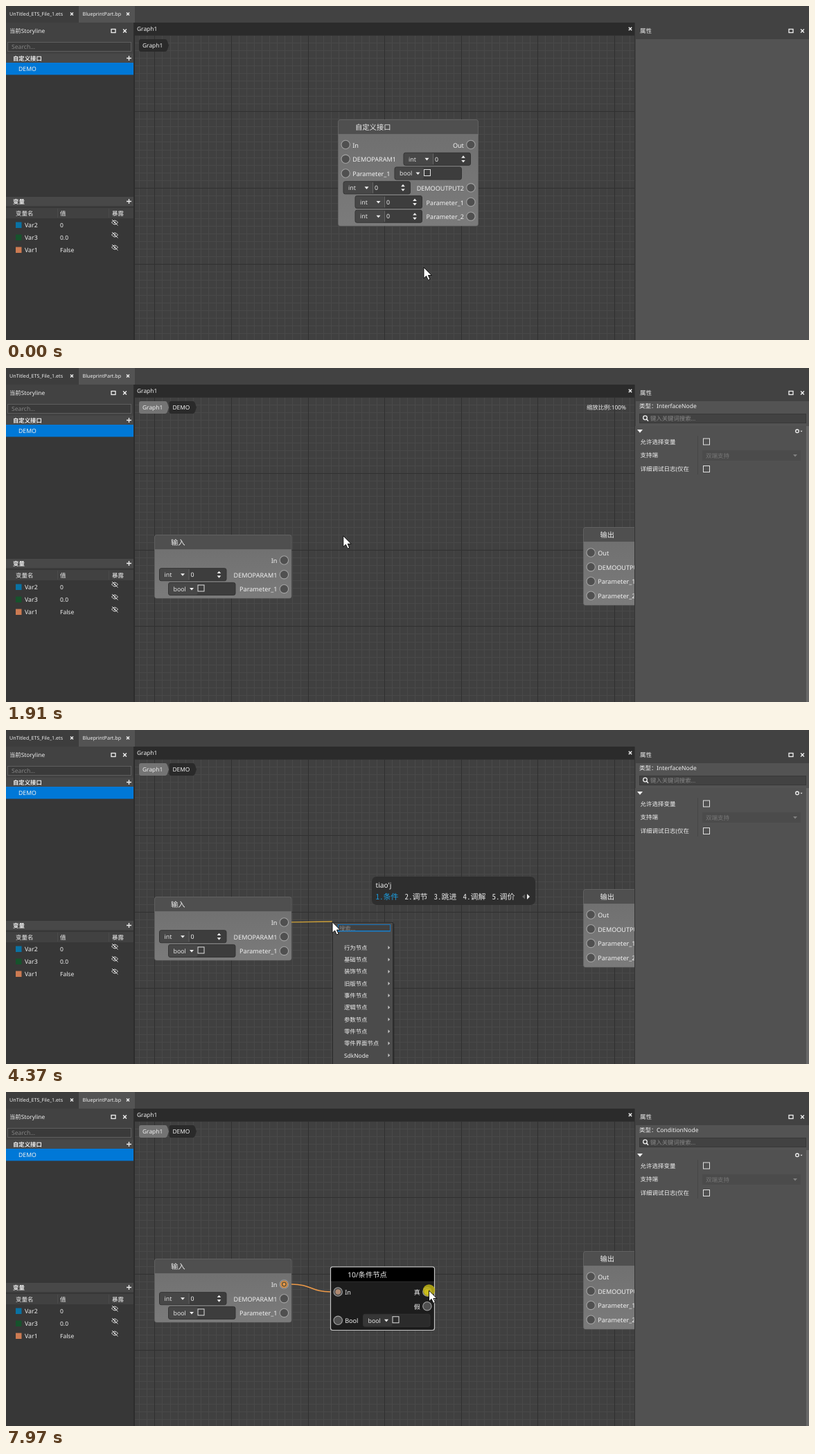
Write an HTML page that moves like this. It is 1159 by 483 pixels and loops after 8 s.

```html
<!DOCTYPE html>
<html>
<head>
<meta charset="utf-8">
<style>
html, body { margin: 0; width: 100%; height: 100%; overflow: hidden; background: #404040; }
svg { display: block; width: 1159px; height: 483px; }
text { font-family: "Noto Sans", "Noto Sans CJK SC", "Noto Sans CJK", sans-serif; text-rendering: geometricPrecision; white-space: pre; }
.ime text { font-family: "Noto Sans Mono CJK SC", "Noto Sans CJK SC", "Noto Sans CJK", monospace; }
</style>
</head>
<body>
<svg id="stage" viewBox="0 0 1159 483"></svg>
<script>
const LOOP = 8000;
const WHITE = '#f0f0f0', ORANGE = '#ee9a48';

// Markup helpers; text is placed by its vertical centre.
const rect = (x, y, w, h, fill, extra = '') =>
  `<rect x="${x}" y="${y}" width="${w}" height="${h}" fill="${fill}" ${extra}/>`;
const path = (d, stroke, width = 1, extra = 'fill="none"') =>
  `<path d="${d}" stroke="${stroke}" stroke-width="${width}" ${extra}/>`;
const shape = (d, fill) => `<path d="${d}" fill="${fill}"/>`;
const circle = (x, y, r, fill, extra = '') =>
  `<circle cx="${x}" cy="${y}" r="${r}" fill="${fill}" ${extra}/>`;
const text = (x, y, str, size = 8.5, fill = WHITE, extra = '') =>
  `<text x="${x}" y="${y + size * 0.37}" font-size="${size}" fill="${fill}" ${extra}>${str}</text>`;
const group = (id, body, extra = '') => `<g id="${id}" ${extra}>${body}</g>`;

const END = 'text-anchor="end"', BOLD = 'font-weight="700"';
const down = (x, y, s = 3, fill = WHITE) => shape(`M${x - s} ${y - s / 2}h${2 * s}l${-s} ${s * 1.2}z`, fill);
const up = (x, y, s = 3) => shape(`M${x - s} ${y + s / 2}h${2 * s}l${-s} ${-s * 1.2}z`, WHITE);
const right = (x, y, s, fill = '#c8c8c8') => shape(`M${x} ${y - s}l${s} ${s}l${-s} ${s}z`, fill);
const cross = (x, y, s = 2.4) => path(`M${x - s} ${y - s}l${2 * s} ${2 * s}m0 ${-2 * s}l${-2 * s} ${2 * s}`, WHITE, 1.4);
const plus = (x, y) => path(`M${x - 3.5} ${y}h7m-3.5 -3.5v7`, WHITE, 1.3);
const maximize = (x, y) => rect(x - 3, y - 2.5, 6, 5, 'none', `stroke="${WHITE}" stroke-width="1.3"`);
const checkbox = (x, y) => rect(x - 4.5, y - 4.5, 9, 9, 'none', 'stroke="#e0e0e0"');
const hiddenEye = (x, y) =>
  path(`M${x - 4.5} ${y}q4.5 -6 9 0q-4.5 6 -9 0M${x - 4} ${y - 4}l8.5 8.5`, '#d8d8d8', 1) + circle(x, y, 1.3, '#d8d8d8');

function gridLines(step, color) {
  let d = '';
  for (let x = 214.4 - 2 * step; x < 908; x += step) if (x > 186) d += `M${Math.round(x) + 0.5} 42V483`;
  for (let y = 153.2 - 10 * step; y < 483; y += step) if (y > 42) d += `M186 ${Math.round(y) - 0.5}H908`;
  return path(d, color);
}

function widget(type, x, y, dark) {
  const box = rect(x, y - 9, 96.5, 18, dark ? '#2b2b2b' : '#3d3d3d', 'rx="2.5" stroke="#333"')
    + rect(x + 0.5, y - 8.5, 41.5, 17, dark ? '#363636' : '#474747', 'rx="2"')
    + text(x + 7, y, type, 8.8, '#e4e4e4') + down(x + 33.5, y);
  if (type === 'bool') return box + checkbox(x + 47, y - 1);
  return box + path(`M${x + 42.5} ${y - 8}v16`, '#666') + text(x + 45, y, '0', 8.8)
    + up(x + 86, y - 3, 2.8) + down(x + 86, y + 3, 2.8);
}

const port = (x, y) => circle(x, y, 6.2, '#505050', 'stroke="#a2a2a2" stroke-width="1.1"');
const litPort = (x, y) => circle(x, y, 4.5, '#6b5a3c', `stroke="${ORANGE}" stroke-width="1.6"`) + circle(x, y, 2, ORANGE);

// Each row: [y, label, side, widget type, widget x]
function node({ x, y, w, h, title, titleX, rows }, selected) {
  const outline = `M${x + 3} ${y}H${x + w - 3}q3 0 3 3V${y + 22}H${x}V${y + 3}q0 -3 3 -3z`;
  const body = rect(x, y, w, h, selected ? '#1d1d1d' : 'url(#body)', 'rx="3"')
    + shape(outline, selected ? '#000' : '#4f4f4f')
    + path(`M${x} ${y + 21.5}h${w}`, selected ? '#333' : '#868686')
    + rect(x, y, w, h, 'none', `rx="3" stroke="${selected ? '#c4c4c4' : '#6a6a6a'}" stroke-width="${selected ? 1.2 : 0.6}"`)
    + text(titleX, y + 11, title, 10.3);
  return body + rows.map(([ry, label, side, type, wx]) => {
    const left = side === 'L', px = left ? x + 10.7 : x + w - 10.6;
    return port(px, ry) + text(left ? px + 10 : px - 10, ry + 0.7, label, 9.1, WHITE, left ? '' : END)
      + (type ? widget(type, wx, ry, selected) : '');
  }).join('');
}

const custom = { x: 479.5, y: 164.5, w: 202, h: 153.5, title: '自定义接口', titleX: 504, rows: [
  [200.5, 'In', 'L'], [200.5, 'Out', 'R'], [221.3, 'DEMOPARAM1', 'L', 'int', 574], [242, 'Parameter_1', 'L', 'bool', 561],
  [262.8, 'DEMOOUTPUT2', 'R', 'int', 487], [283.5, 'Parameter_1', 'R', 'int', 504], [304.2, 'Parameter_2', 'R', 'int', 504]] };
const input = { x: 214.5, y: 241.5, w: 197.5, h: 91.5, title: '输入', titleX: 238, rows: [
  [278, 'In', 'R'], [298.7, 'DEMOPARAM1', 'R', 'int', 221.5], [319.4, 'Parameter_1', 'R', 'bool', 234.5]] };
const output = { x: 833.5, y: 230.5, w: 120, h: 112.5, title: '输出', titleX: 857.5, rows: [
  [267, 'Out', 'L'], [287.7, 'DEMOOUTPUT2', 'L'], [308.4, 'Parameter_1', 'L'], [329.2, 'Parameter_2', 'L']] };
const condition = { x: 468.5, y: 252.8, w: 150, h: 91.7, title: '10/条件节点', titleX: 493, rows: [
  [289, 'In', 'L'], [289, '真', 'R'], [309.7, '假', 'R'], [330.3, 'Bool', 'L', 'bool', 515.5]] };

function leftPanel() {
  const vars = [['Var2', '0', '#0a72a3'], ['Var3', '0.0', '#16532c'], ['Var1', 'False', '#cc7b52']];
  return rect(0, 0, 1159, 24, '#424242') + rect(0, 0, 105, 24, '#3d3d3d') + rect(105, 0, 81, 24, '#535353')
    + text(5, 11.5, 'UnTitled_ETS_File_1.ets', 7.15) + cross(95, 11.5, 2)
    + text(110.5, 11.5, 'BlueprintPart.bp', 7.15) + cross(176, 11.5, 2)
    + rect(0, 24, 184, 459, '#373737') + rect(0, 24, 184, 45, '#424242') + rect(184, 24, 2, 459, '#2c2c2c')
    + text(5, 36, '当前Storyline', 8.35) + maximize(155, 36) + cross(171.5, 36)
    + rect(2.5, 52.5, 178, 13, '#3a3a3a', 'stroke="#5e5e5e"') + text(8, 59, 'Search...', 8.6, '#858585')
    + rect(0, 69, 184, 13, '#484848') + text(10, 75.5, '自定义接口', 8.4, WHITE, BOLD) + plus(177.5, 75.5)
    + rect(0, 82, 184, 17.5, '#0078d7') + text(18, 91, 'DEMO', 8.7)
    + rect(0, 276, 184, 13.5, '#484848') + text(10, 283, '变量', 8.5, WHITE, BOLD) + plus(177.5, 282.5)
    + rect(0, 292, 184, 15, '#414141') + path('M74.5 293v13M148.5 293v13', '#4b4b4b')
    + text(14, 300, '变量名') + text(78, 300, '值') + text(153, 300, '暴露')
    + vars.map(([name, value, color], i) => {
      const y = 317 + i * 18;
      return rect(14, y - 4.5, 8.5, 8.5, color) + text(27, y, name, 8.8) + text(78, y, value) + hiddenEye(157, y - 4);
    }).join('');
}

function properties() {
  const rows = [[106.5, '允许选择变量'], [126, '支持端'], [146, '详细调试日志(仅在']];
  return text(914, 55, '类型：') + `<text id="type" x="939" y="58.2" font-size="8.5" fill="${WHITE}"></text>`
    + rect(914.5, 66.5, 240, 13, '#424242', 'stroke="#383838"')
    + circle(922.5, 72, 2.8, 'none', `stroke="${WHITE}" stroke-width="1.3"`) + path('M924.5 74l2.5 2.7', WHITE, 1.5)
    + text(930, 73, '键入关键词搜索...', 8.4, '#888')
    + rect(908, 84, 247, 399, '#515151') + rect(1155, 84, 4, 399, '#686868')
    + down(915, 91, 4) + circle(1142, 91.3, 2.3, 'none', `stroke="${WHITE}" stroke-width="1.3"`) + down(1148, 91.5, 1.5)
    + path('M998.5 98V154', '#474747')
    + rows.map(([y, label]) => text(915.5, y, label)).join('')
    + checkbox(1011, 106.5) + checkbox(1011, 146)
    + rect(1005, 119, 142, 15, '#4b4b4b') + text(1010, 127, '双端支持', 8.5, '#777') + down(1139, 126.5, 3, '#808080');
}

const crumb = (x, w, label, fill) =>
  shape(`M${x + 3} 48H${x + w - 3}q2 0 3 3l2 6l-2 6q-1 3 -3 3H${x + 3}q-3 0 -3 -3V51q0 -3 3 -3z`, fill) + text(x + 5, 57, label, 8.4);

function menuFrame(h, focused) {
  return rect(473, 280, 87.5, h, '#222', 'opacity=".6"') + rect(471.5, 278.5, 87, h, '#4b4b4b', 'stroke="#2c2c2c"')
    + rect(479.5, 281.5, 75, 9, '#404040', `stroke="${focused ? '#1674bd' : '#303030'}"`)
    + (focused ? path('M479 291H555', '#1583d8', 1.2) : '');
}
function fullMenu() {
  const items = ['行为节点', '基础节点', '装饰节点', '旧版节点', '事件节点', '逻辑节点', '参数节点', '零件节点', '零件界面节点', 'SdkNode'];
  return menuFrame(230, true) + items.map((label, i) => {
    const y = 314.7 + i * 17.3;
    return text(488, y, label, 8.4) + right(551.5, y, 2.6);
  }).join('');
}
function filteredMenu(chosen) {
  const fileIcon = y => path(`M480 ${y + 4.5}h-4.5v-9h5l2.5 2.5v2`, '#ddd', 0.9) + circle(482, y + 2.3, 2, 'none', 'stroke="#ddd" stroke-width=".9"');
  return menuFrame(68.5, chosen < 0) + text(481, 286.5, '条件', 8.3)
    + ['条件遍历节点', '10/条件节点', '时间条件通过'].map((label, i) => {
      const y = 303 + i * 17.3;
      return (i === chosen ? rect(472, y - 8.7, 86.5, 17.3, '#0a70e8') : '') + fileIcon(y) + text(488, y, label, 8.4);
    }).join('');
}

function candidates(typed, words) {
  const pitch = words[0].length * 11 + 20, w = words.length * pitch + 26;
  return rect(528, 212, w, 41, '#2e2e2e', 'rx="7"')
    + text(533.5, 224, typed, 10.2, WHITE, `style="font-family:'Noto Sans',sans-serif"`)
    + words.map((word, i) => text(533.5 + i * pitch, 240.5, `${i + 1}.${word}`, 11, i ? '#e8e8e8' : '#1b9de0', 'font-weight="300"')).join('')
    + shape(`M${528 + w - 15} 237.5v7l-4 -3.5z`, '#666') + right(528 + w - 12, 241, 4, WHITE);
}
const typing = [
  [3770, 't', [...'他她天图题']], [3870, 'ti', [...'题提体替梯']], [3970, 'tia', [...'条调跳挑天']],
  [4100, 'tiao', [...'条调跳挑眺']], [4300, "tiao'j", ['条件', '调节', '跳进', '调解', '调价']]];

const ids = {};
document.getElementById('stage').innerHTML = `
  <defs>
    <linearGradient id="body" x2="0" y2="1"><stop stop-color="#6e6e6e"/><stop offset="1" stop-color="#7b7b7b"/></linearGradient>
    <clipPath id="view"><rect x="186" y="42" width="721" height="441"/></clipPath>
  </defs>`
  + rect(186, 42, 722, 441, '#404040') + gridLines(11.06, '#494949') + gridLines(110.6, '#303030')
  + leftPanel()
  + rect(186, 24, 722, 18, '#2b2b2b') + text(189, 33, 'Graph1', 8.4) + cross(901, 33, 2.2)
  + rect(907, 24, 252, 459, '#535353') + rect(907, 24, 1.5, 459, '#333') + rect(908, 24, 251, 24, '#424242')
  + text(915, 36, '属性') + maximize(1133, 36) + cross(1149.5, 36)
  + group('props', properties())
  + group('outer', crumb(192, 41, 'Graph1', '#2a2a2a') + group('customIdle', node(custom)) + group('customPicked', node(custom, true)))
  + group('inner', crumb(235.5, 37.5, 'DEMO', '#2a2a2a') + crumb(192, 41, 'Graph1', '#747474')
    + node(input) + node(output)
    + group('lit', litPort(401.4, 278))
    + `<path id="wire" fill="none"/>`, 'clip-path="url(#view)"')
  + group('zoom', text(895, 56.5, '缩放比例:100%', 8.4, WHITE, END))
  + group('placed', node(condition, true) + circle(479.2, 289, 3.8, '#b08a72')
    + group('portHot', circle(607.9, 289, 4, '#d8c43a')))
  + group('menu', fullMenu() + group('hint', text(481, 286.5, '搜索...', 8.3, '#888')) + group('committed', text(481, 286.5, '条件', 8.3)))
  + group('filtered', filteredMenu(-1)) + group('chosen', filteredMenu(1))
  + group('caret', path('M497.5 282v8', WHITE))
  + group('ime', '', 'class="ime"')
  + group('pointer', circle(0, 0, 8.7, '#c9bd14', 'opacity=".8" id="press"')
    + group('arrow', path('M0 0V15.8L3.6 12.4L6.3 18.4L9 17.2L6.4 11.5H11.3Z', '#000', 0.9, 'fill="#fff"'))
    + group('move', path('M1 6.5H12M6.5 1V12', '#111', 1.6, 'fill="none" stroke-dasharray="1.8 1"')
      + shape('M6.5 0l2 2.5h-4zM6.5 13l2 -2.5h-4zM0 6.5l2.5 -2v4zM13 6.5l-2.5 -2v4z', '#111')
      + circle(6.5, 6.5, 1, '#ddd')));
document.querySelectorAll('[id]').forEach(el => ids[el.id] = el);

const track = [
  [133, 603, 378], [620, 567, 200], [1353, 567, 200], [1530, 576, 206], [2187, 404, 277], [2267, 404, 277],
  [2667, 459, 278], [3020, 471, 277.5], [7067, 471, 278], [7133, 474, 281], [7700, 610.5, 287]];

function pointerAt(t) {
  const i = track.findIndex(key => key[0] > t);
  if (i === 0) return track[0].slice(1);
  if (i < 0) return track.at(-1).slice(1);
  const [t0, x0, y0] = track[i - 1], [t1, x1, y1] = track[i];
  const p = (t - t0) / (t1 - t0), e = p * p * (3 - 2 * p);
  return [x0 + (x1 - x0) * e, y0 + (y1 - y0) * e];
}

const show = (id, on) => ids[id].setAttribute('display', on ? 'inline' : 'none');

function render(t) {
  const within = (a, b = LOOP) => t >= a && t < b;
  const tick = 1000 / 15;
  const [x, y] = pointerAt(Math.floor((t + 4) / tick) * tick);
  const dragging = within(2330, 3090), linked = within(6290);

  show('outer', within(0, 1020));
  show('customIdle', within(0, 660));
  show('customPicked', within(660, 1020));
  show('inner', within(1020));
  show('zoom', within(1020, 3000));
  show('props', within(660));
  ids.type.textContent = linked ? 'ConditionNode' : 'InterfaceNode';

  show('lit', within(2260, 3090) || linked);
  show('wire', within(2330));
  ids.wire.setAttribute('d', linked ? 'M412 278C441 278 440 289 469 289'
    : `M412 277.8L${dragging ? `${x} ${y}` : '471 277'}`);
  ids.wire.setAttribute('stroke', linked ? ORANGE : dragging ? '#eda93c' : '#cfa238');
  ids.wire.setAttribute('stroke-width', linked || dragging ? 1.6 : 1.3);

  show('menu', within(3160, 4640));
  show('hint', within(0, 4570));
  show('committed', within(4570));
  show('filtered', within(4640, 5960));
  show('chosen', within(5960, 6290));
  show('caret', within(4640, 5170) || within(5700, 5960));
  const word = within(3770, 4570) && typing.findLast(step => step[0] <= t);
  ids.ime.innerHTML = word ? candidates(word[1], word[2]) : '';

  show('placed', linked);
  show('portHot', within(7970));
  show('press', within(660, 740) || within(800, 890) || within(2260, 3090) || within(7970));
  show('arrow', !dragging);
  show('move', dragging);
  ids.pointer.setAttribute('transform', `translate(${x} ${y})`);
}

function frame(now) {
  render(now % LOOP);
  requestAnimationFrame(frame);
}
render(0);
requestAnimationFrame(frame);
</script>
</body>
</html>
```
